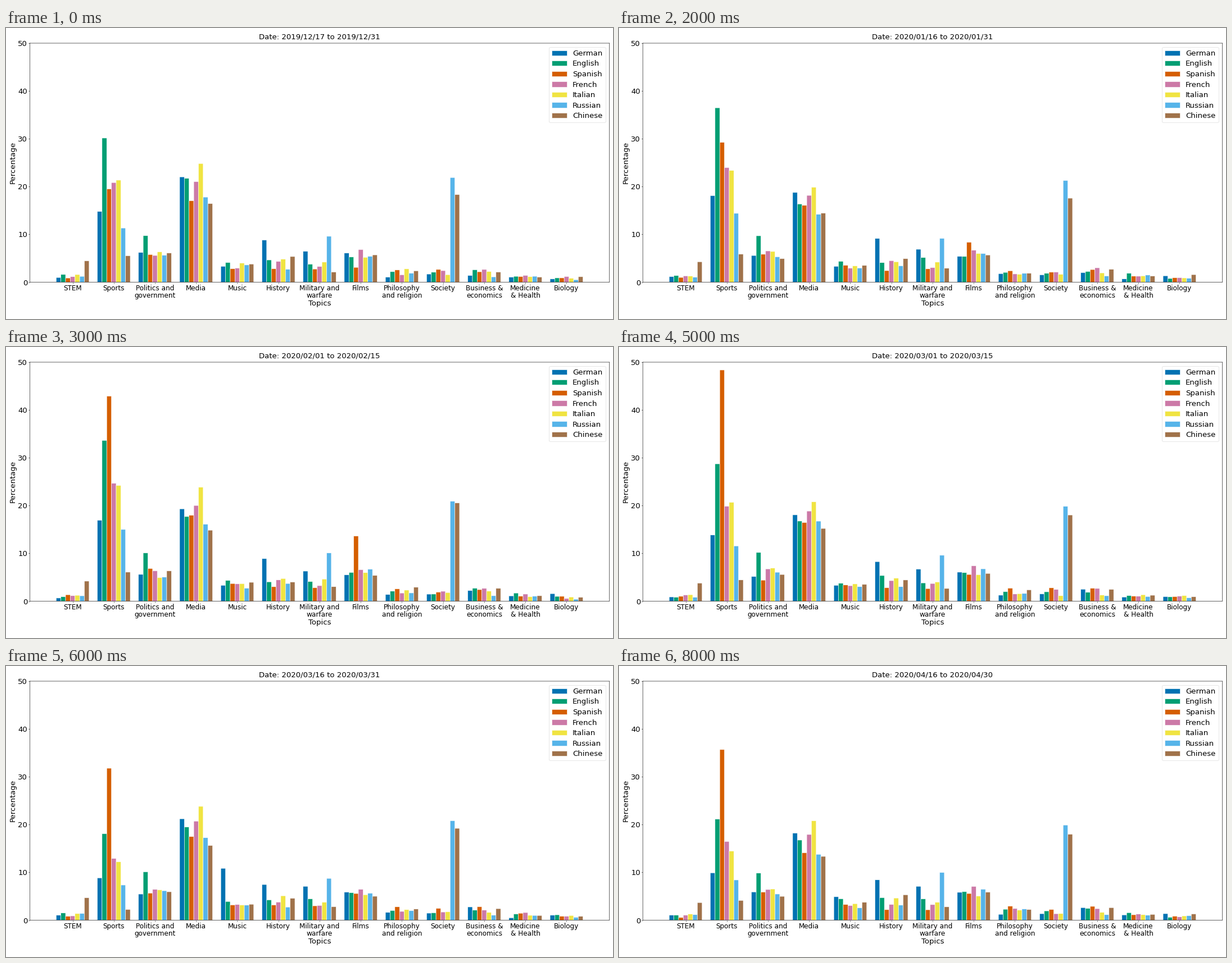
Recreate the animation shown at these times as a matplotlib script. Size 1080x518 px, loop 9000 ms.

```python
import numpy as np
import matplotlib.pyplot as plt
from matplotlib.animation import FuncAnimation

W, H, DPI = 1080, 518, 100
PX = 72 / DPI  # points per pixel
LEFT, RIGHT, TOP, BOTTOM = 42.4, 1073.5, 27, 452.5

LANGS = {
    "German": "#0072b2", "English": "#009e73", "Spanish": "#d55e00",
    "French": "#cc79a7", "Italian": "#f0e442", "Russian": "#56b4e9",
    "Chinese": "#a0724a",
}

# Usual percentage of each topic
TOPICS = {
    "STEM": 1.2, "Sports": 19.5, "Politics and\ngovernment": 6.3,
    "Media": 15.8, "Music": 3.5, "History": 4.5,
    "Military and\nwarfare": 3.6, "Films": 6.2,
    "Philosophy\nand religion": 2.2, "Society": 2.1,
    "Business &\neconomics": 2.3, "Medicine\n& Health": 1.2, "Biology": 1.1,
}

# Languages that stand out in a topic
STANDOUT = {
    "STEM Chinese": 4.2, "Sports German": 13.8, "Sports English": 28,
    "Sports Russian": 10.6, "Sports Chinese": 4.6, "Politics English": 10.2,
    "Media German": 18.9, "Media French": 18.8, "Media Italian": 21.3,
    "History German": 8.5, "Military German": 6.8, "Military Russian": 9.2,
    "Society Russian": 20.3, "Society Chinese": 18.4,
}

# Key points (period, factor) of the strongest movements
TRENDS = {
    "Sports": [(0, 1.08), (3, 1.25), (5, 1.05), (6, 0.65), (8, 0.8)],
    "Sports Spanish": [(0, 1), (1, 0.8), (3, 2.2), (5, 2.48), (6, 1.63),
                       (8, 1.83)],
    "Media": [(0, 1.12), (1, 0.81), (3, 1.06), (5, 0.95), (6, 1.11), (8, 0.95)],
    "Music German": [(5, 0.95), (6, 3.1), (8, 1.4)],
    "Films Spanish": [(1, 0.5), (3, 2.2), (5, 0.9)],
}


def half_months():
    """The second half of December, then both halves of four months."""
    dates = ["2019/12/17 to 2019/12/31"]
    for month, last in enumerate([31, 29, 31, 30], 1):
        for a, b in ((1, 15), (16, last)):
            dates.append(f"2020/{month:02}/{a:02} to 2020/{month:02}/{b:02}")
    return dates


PERIODS = half_months()


def percentages():
    """Heights by topic, language and period; small topics vary the most."""
    rng = np.random.default_rng(4)
    n = len(PERIODS)
    rows = []
    for topic, level in TOPICS.items():
        word = topic.split()[0]
        for lang in LANGS:
            key = f"{word} {lang}"
            lean, noise = rng.normal(0, 0.25), rng.normal(0, 0.2, n)
            base = STANDOUT.get(key, level)
            if key in STANDOUT or key in TRENDS:
                lean = 0
            trend = TRENDS.get(key, TRENDS.get(word, [(0, 1)]))
            factor = np.interp(range(n), *zip(*trend))
            if key in TRENDS:
                noise = noise * 0
            vary = 1 + (lean + noise) / np.sqrt(base)
            rows.append(base * factor * np.clip(vary, 0.1, 2))
    return np.reshape(rows, (len(TOPICS), len(LANGS), n))


BIG, SMALL = 13.2 * PX, 12 * PX
LINE = 0.6 * PX
plt.rcParams.update({
    "font.family": "DejaVu Sans",
    "axes.linewidth": LINE,
    "patch.linewidth": LINE,
})

fig = plt.figure(figsize=(W / DPI, H / DPI), dpi=DPI, facecolor="white")
ax = fig.add_axes([LEFT / W, 1 - BOTTOM / H,
                   (RIGHT - LEFT) / W, (BOTTOM - TOP) / H])

x = np.arange(len(TOPICS))
step = 0.8 / len(LANGS)
groups = [
    ax.bar(x - 0.4 + (k + 0.5) * step, np.zeros(len(x)), step, label=name,
           color=color, edgecolor="white", linewidth=LINE, snap=False)
    for k, (name, color) in enumerate(LANGS.items())
]

ax.set_xlim(-1.04, len(TOPICS) + 0.04)
ax.set_ylim(0, 50)
ax.set_yticks(range(0, 51, 10))
ax.set_xticks(x, list(TOPICS), linespacing=1.03)
ax.tick_params(length=2.1 * PX, width=LINE, pad=2.1 * PX)
ax.tick_params(axis="x", labelsize=SMALL)
ax.tick_params(axis="y", labelsize=BIG)
ax.set_xlabel("Topics", fontsize=BIG, labelpad=PX)
ax.set_ylabel("Percentage", fontsize=BIG, labelpad=2.4 * PX)
title = ax.set_title("", fontsize=BIG, pad=7.1 * PX)
ax.legend(loc="upper right", fontsize=BIG, labelspacing=0.42)
for spine in ax.spines.values():
    spine.set_snap(False)

heights = percentages()


def update(i):
    title.set_text("Date: " + PERIODS[i])
    for bars, column in zip(groups, heights[:, :, i].T):
        for bar, value in zip(bars, column):
            bar.set_height(value)
    return []


anim = FuncAnimation(fig, update, frames=len(PERIODS), interval=1000,
                     init_func=lambda: update(0), repeat=True,
                     repeat_delay=0, blit=False)
plt.show()
```
